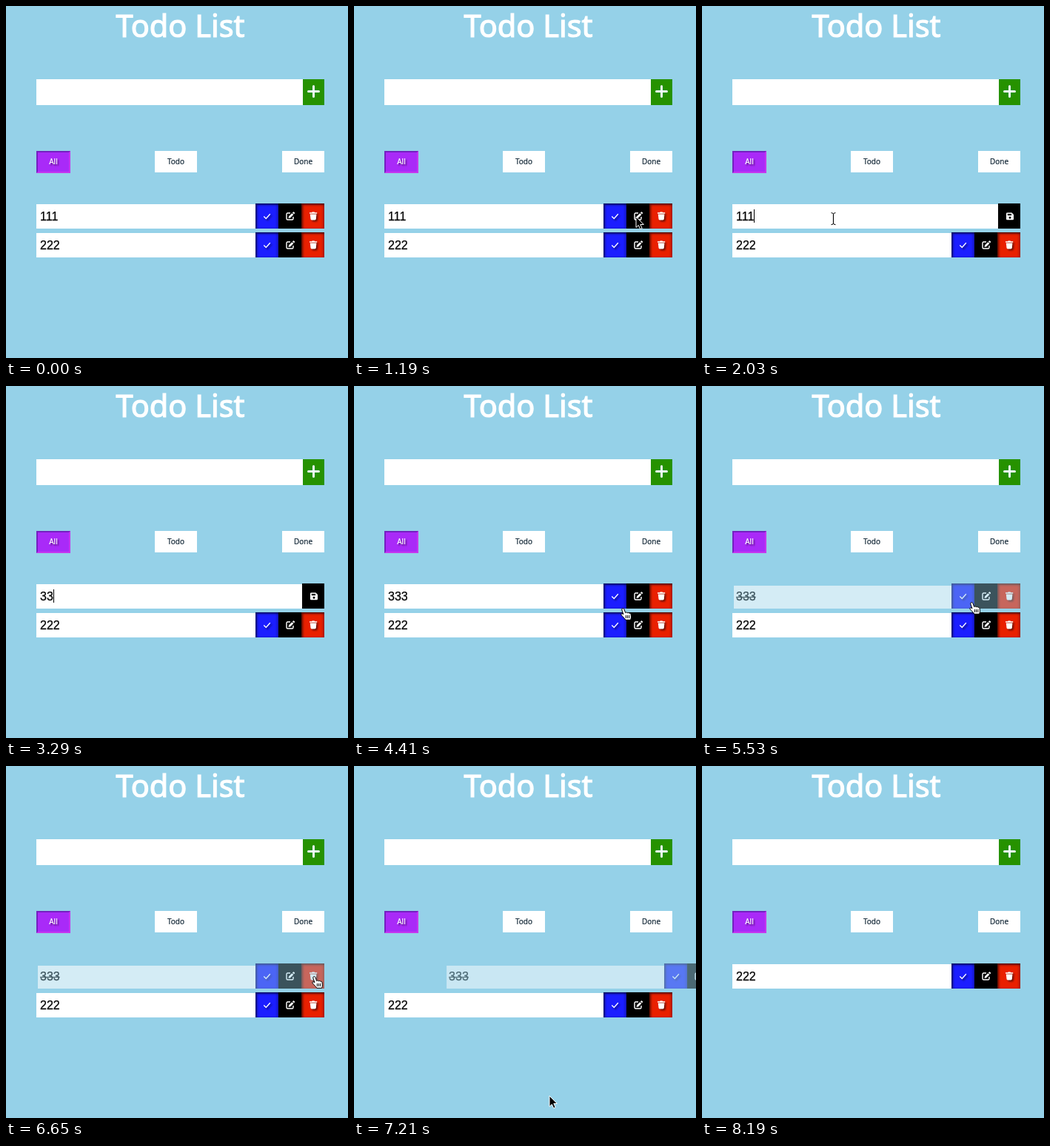
An HTML page that plays this animation: 462x476 px, repeating every 8260 ms.

```html
<!DOCTYPE html>
<html lang="en">
<head>
<meta charset="utf-8">
<title>Todo List</title>
<style>
html, body { margin: 0; width: 100%; height: 100%; overflow: hidden; }
body { position: relative; background: #95d1e8; }
div, h1, svg { position: absolute; box-sizing: border-box; }
h1 { left: 0; top: 0; width: 471px; margin: 0; color: #fff; text-align: center;
  font: 400 41.5px/53px "Noto Sans", sans-serif; white-space: nowrap; -webkit-text-stroke: 1.2px #fff; }
.new { left: 41px; top: 99px; width: 360px; height: 35px; background: #fff; }
.add { left: 401px; top: 99px; width: 29px; height: 35px; background: #269200; }
.tab { top: 196px; width: 57px; height: 29px; background: #fff; color: #172b3a;
  font: 10px/29px "Noto Sans", sans-serif; text-align: center; -webkit-text-stroke: .2px; }
.tab.on { left: 41px; width: 46px; height: 30px; line-height: 24px; background: #a92af8; color: #fff;
  border: 2px solid; border-color: #7420c0 #c636ee #c636ee #7420c0;
  text-shadow: 2px 2px 2px #0008; }
.row { left: 0; width: 462px; height: 35px; }
.field { left: 41px; top: 1px; width: 296px; height: 33px; background: #fff; }
.text { left: 46px; top: 1px; color: #000; white-space: pre;
  font: 16px/33px "Liberation Sans", Arial, sans-serif; -webkit-text-stroke: .25px; }
.text.caret { border-right: 1px solid #000; height: 18px; top: 8px; line-height: 19px; }
.btn { top: 0; width: 31px; height: 34px;
  box-shadow: inset 2px 2px 3px #0009, inset -2px 0 3px #0004; }
.btn svg { left: 9.5px; top: 11px; width: 12px; height: 12px; filter: drop-shadow(2px 2px 1px #0008); }
.check { left: 337px; background: #1b1eff; }
.edit { left: 368px; background: #000; }
.trash { left: 399px; background: #e92000; }
.save { left: 400px; width: 30px; background: #000; }
.editing .field { width: 359px; }
.editing .check, .editing .edit, .editing .trash, .row:not(.editing) .save { display: none; }
.done .field { left: 43px; top: 3px; width: 294px; height: 31px; }
.done .text { text-decoration: line-through; }
#cursor { left: 0; top: 0; width: 24px; height: 26px; overflow: visible; }
</style>
</head>
<body>
<h1>Todo List</h1>
<div class="new"></div>
<div class="add"><svg width="29" height="35"><path d="M7.500 16.500h14M14.500 9.500v14" stroke="#f0f8ff" stroke-width="3" stroke-linecap="round"/></svg></div>
<div class="tab on">All</div>
<div class="tab" style="left:201px">Todo</div>
<div class="tab" style="left:373px">Done</div>
<svg id="cursor">
  <path data-kind="arrow" d="M0 0v14.500l3.300-3 2.400 5.200 2.500-1.100-2.400-5.100h4.500z" stroke="#fff"/>
  <path data-kind="hand" d="M1.2 1.2C2.4 0 3.6.8 4 2l1.6 4.6c1-.9 2.2-.5 2.7.2 1-.7 2-.3 2.5.5 1.3-.4 2.1.4 2.3 1.5l.4 3c.2 2-.6 3-.9 4.5H5.8C4.6 14 2 12 .2 9.8c-1-1.4.6-2.7 2-1.5l.8.7L.9 3C.7 2.3.7 1.7 1.2 1.2zM6.4 10v4M8.6 10v4M10.8 10v4" fill="#fff" stroke="#000"/>
  <path data-kind="beam" d="M-3-8q3 0 3 2V6q0 2-3 2M3-8q-3 0-3 2V6q0 2 3 2" fill="none" stroke="#000"/>
</svg>
<script>
const LOOP = 8260;
const icons = {
  check: '<path d="M1.300 6.500l3 3 5.500-6.200" fill="none" stroke="#fff" stroke-width="1.300"/>',
  edit: '<path d="M6 2H2.5Q1 2 1 3.5v6Q1 11 2.5 11h6Q10 11 10 9.5V7" fill="none" stroke="#fff" stroke-width="1.4"/>' +
    '<path d="M4 6.5L8.3 2.2l2 2L6 8.5l-2.5.5zM8.9 1.6L10 .5q.6-.4 1.2.2l.8.8q.4.6-.1 1.1l-1 1z" fill="#fff"/>',
  trash: '<path d="M1 1.3h3L4.6.5h3l.6.8h3v1.5H1zM1.8 3.5h8.6L9.8 10q-.1 1.4-1.5 1.4H4q-1.4 0-1.5-1.4z" fill="#fff"/>',
  save: '<path fill-rule="evenodd" d="M2.3 1.5H8.5L11 4v6q0 1.3-1.3 1.3H2.3Q1 11.3 1 10V2.8Q1 1.5 2.3 1.5zM2.8 3v2.3H8V3zM6 6.8a1.5 1.5 0 1 0 .01 0z" fill="#fff"/>'
};

function makeRow() {
  const row = document.createElement('div');
  row.innerHTML = '<div class="field"></div><div class="text"></div>' +
    Object.entries(icons).map(([name, art]) =>
      `<div class="btn ${name}"><svg viewBox="0 0 12 12">${art}</svg></div>`).join('');
  document.body.insertBefore(row, cursor);
  return row;
}
const cursor = document.getElementById('cursor');
const first = makeRow(), second = makeRow();
second.className = 'row';
second.querySelector('.text').textContent = '222';

// Pointer stops: time, x, y, shape held until the next stop
const stops = [
  [0, 262, 482, 'arrow'], [110, 264, 446, 'arrow'], [1120, 381, 286, 'arrow'],
  [1260, 381, 284, 'hand'], [1700, 381, 284, 'beam'], [2100, 160, 288, 'beam'],
  [2280, 160, 288, 'beam'], [2500, 76, 286, 'none'], [3480, 76, 286, 'beam'],
  [3800, 398, 284, 'hand'], [3900, 414, 284, 'hand'], [4040, 414, 284, 'hand'],
  [4200, 436, 302, 'hand'], [4410, 361, 300, 'hand'], [4620, 362, 292, 'hand'],
  [5880, 362, 292, 'hand'], [6230, 414, 284, 'hand'], [6790, 414, 284, 'hand'],
  [6860, 400, 304, 'arrow'], [7210, 264, 446, 'arrow'], [7960, 264, 446, 'arrow'],
  [8110, 262, 482, 'none'], [LOOP, 262, 482, 'none']
];
// Text of the first row: time, value
const typing = [[0, '111'], [2520, '11'], [2660, '1'], [2800, ''],
  [3080, '3'], [3220, '33'], [3430, '333']];

const CLICK_EDIT = 1470, CLICK_SAVE = 3970, CLICK_DONE = 4970;
const SLIDE = 6980, GONE = 7840;
const ease = p => p * p * (3 - 2 * p);
const lastBefore = (list, t) => list.findLastIndex(item => item[0] <= t);

function drawCursor(t) {
  const i = Math.min(lastBefore(stops, t), stops.length - 2);
  const [t0, x0, y0, kind] = stops[i], [t1, x1, y1] = stops[i + 1];
  const p = ease((t - t0) / (t1 - t0));
  cursor.style.transform = `translate(${x0 + (x1 - x0) * p}px, ${y0 + (y1 - y0) * p}px)`;
  for (const shape of cursor.children)
    shape.style.display = shape.dataset.kind === kind ? '' : 'none';
}

function draw(t) {
  const editing = t >= CLICK_EDIT && t < CLICK_SAVE;
  const done = t >= CLICK_DONE;
  const p = ease(Math.min(1, Math.max(0, (t - SLIDE) / (GONE - SLIDE))));
  first.className = 'row' + (editing ? ' editing' : '') + (done ? ' done' : '');
  const text = first.querySelector('.text');
  text.className = editing ? 'text caret' : 'text';
  text.textContent = typing[lastBefore(typing, t)][1];
  first.style.cssText = `top: 267px; opacity: ${done ? 0.6 * (1 - p) : 1}; transform: translateX(${462 * p}px)`;
  second.style.top = (t < GONE ? 306 : 267) + 'px';
  drawCursor(t);
}

const start = performance.now();
function tick() {
  draw((performance.now() - start) % LOOP);
  requestAnimationFrame(tick);
}
tick();
</script>
</body>
</html>
```
